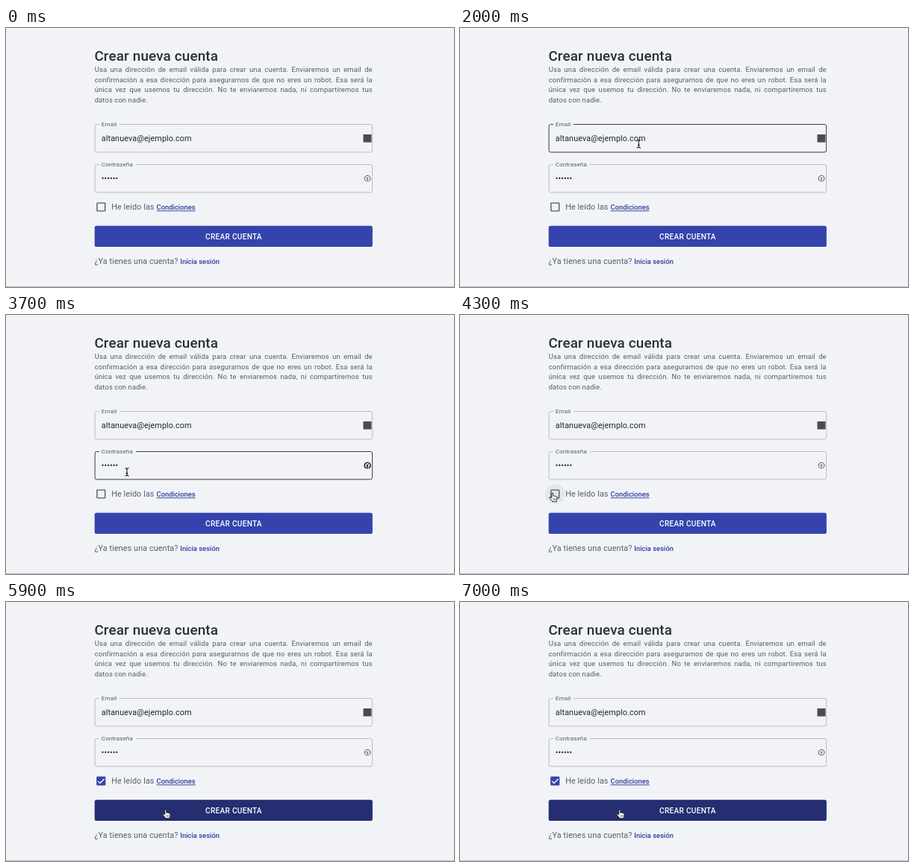
An HTML page that plays this animation: 600 px wide and 348 px high, repeating every 7.1 s.

```html
<!DOCTYPE html>
<html lang="es">
<head>
<meta charset="utf-8">
<title>Crear nueva cuenta</title>
<style>
  html, body { margin: 0; width: 100%; height: 100%; overflow: hidden; background: #f1f3f6; }
  #stage { position: absolute; left: 0; top: 0; width: 600px; height: 348px; overflow: hidden; }
  svg { position: absolute; left: 0; top: 0; }
  #stage { font-family: Roboto, Arial, sans-serif; color: #50606d; }
  text { fill: #50606d; }
  .title { font-size: 18.9px; font-weight: 500; letter-spacing: .0075em; fill: #26303b; }
  .intro { position: absolute; left: 118.7px; top: 49px; width: 372px;
    font-size: 9.45px; line-height: 13.5px; letter-spacing: .01071em; }
  .intro div { white-space: nowrap; text-align-last: justify; }
  .intro div:last-child { text-align-last: left; }
  .label { font-size: 8.1px; letter-spacing: .00938em; }
  .body { font-size: 10.8px; letter-spacing: .00938em; }
  .value { fill: #1f262d; }
  .link { font-size: 9.4px; font-weight: 500; fill: #2d3c9f; }
  .action { font-size: 10.1px; font-weight: 500; letter-spacing: .02857em; fill: #fff; text-anchor: middle; }
  .field { fill: none; stroke: #b4b7bb; stroke-width: .9; }
  .field.hover { stroke: #252a30; }
  .key { fill: none; stroke: #4a4d50; stroke-width: 1; }
  .key.hover { stroke: #24272a; stroke-width: 1.6; }
  .cursor { fill: #fff; stroke: #16181b; stroke-width: .9; stroke-linejoin: round; }
</style>
</head>
<body>
<div id="stage">
  <svg width="600" height="348" viewBox="0 0 600 348">
    <defs>
      <clipPath id="buttonClip"><rect x="118.7" y="265.7" width="372.2" height="28.4" rx="2.7"/></clipPath>
    </defs>
    <rect y="347" width="600" height="1" fill="#bfc2c5"/>
    <text class="title" x="118.4" y="43.6">Crear nueva cuenta</text>

    <path id="email" class="field" d="M125 129.5H121.6a2.5 2.5 0 0 0-2.5 2.5V164.4a2.5 2.5 0 0 0 2.5 2.5H488.1a2.5 2.5 0 0 0 2.5-2.5V132a2.5 2.5 0 0 0-2.5-2.5H152"/>
    <text class="label" x="127.8" y="132">Email</text>
    <text class="body value" x="127.8" y="152.4">altanueva@ejemplo.com</text>
    <rect x="478.5" y="143" width="11" height="10.6" fill="#4b4c4e"/>

    <path id="pass" class="field" d="M125 183.5H121.6a2.5 2.5 0 0 0-2.5 2.5V218.4a2.5 2.5 0 0 0 2.5 2.5H488.1a2.5 2.5 0 0 0 2.5-2.5V186a2.5 2.5 0 0 0-2.5-2.5H174"/>
    <text class="label" x="127.8" y="186">Contraseña</text>
    <text class="body value" x="127.8" y="206">••••••</text>
    <g id="key" class="key">
      <path d="M482.6 205.8A3.9 3.9 0 1 1 485.6 205.8"/>
      <path d="M484 202.2V206.6M482.6 201.6h2.8"/>
    </g>

    <circle id="halo" cx="127.3" cy="240.5" r="13.2"/>
    <g transform="translate(119.2 232.4) scale(.675)">
      <rect id="box" x="4" y="4" width="16" height="16" rx="1" stroke-width="2"/>
      <path id="tick" d="M5.8 12.2L10 16.4L18.4 8" fill="none" stroke="#fff" stroke-width="2"/>
    </g>
    <text class="body" x="141.2" y="244.4">He leído las</text>
    <text class="link" x="201.6" y="244.3" text-decoration="underline">Condiciones</text>

    <rect id="shadow" x="119.2" y="267.5" width="371.5" height="29" rx="3" fill="#20284f"/>
    <g clip-path="url(#buttonClip)">
      <rect id="button" x="118" y="265" width="374" height="30"/>
      <circle id="ripple" cx="214" cy="280" fill="#fff"/>
    </g>
    <text class="action" x="304.9" y="283.5">CREAR CUENTA</text>

    <text class="body" x="118.4" y="316.8">¿Ya tienes una cuenta?</text>
    <text class="link" x="233.3" y="316.6">Inicia sesión</text>
  </svg>

  <div class="intro">
    <div>Usa una dirección de email válida para crear una cuenta. Enviaremos un email de</div>
    <div>confirmación a esa dirección para asegurarnos de que no eres un robot. Esa será la</div>
    <div>única vez que usemos tu dirección. No te enviaremos nada, ni compartiremos tus</div>
    <div>datos con nadie.</div>
  </div>

  <svg width="600" height="348" viewBox="0 0 600 348">
    <g id="pointer" class="cursor">
      <path id="arrow" d="M0 0V11.5L2.7 9L4.6 13.2L6.5 12.3L4.7 8.3H8.2Z"/>
      <g id="beam" fill="none">
        <path d="M-2.6 -5.2Q0 -5.2 0 -3.6Q0 -5.2 2.6 -5.2M0 -3.8V3.8M-2.6 5.2Q0 5.2 0 3.6Q0 5.2 2.6 5.2M-1.4 1.6H1.4" stroke-width="1.1"/>
      </g>
      <g id="hand">
        <path d="M-1.2 1.1Q-1.2 0 -.2 0Q.8 0 .8 1.1V4.3Q1.8 3.4 2.7 4.5Q3.7 3.8 4.4 4.9Q5.9 4.5 6 6V8Q6 9.3 5.2 10.4V11.7H-.6V10.7Q-2.2 9.3 -4 6.7Q-4.2 5.5 -3 5.6Q-2 6 -1.2 7.1Z"/>
        <path d="M1.2 7.3V9.7M2.7 7.3V9.7M4.1 7.3V9.7" stroke-width=".6"/>
      </g>
    </g>
  </svg>
</div>

<script>
const LOOP = 7100, STEP = 100;
const el = id => document.getElementById(id);
const show = (id, on) => { el(id).style.display = on ? '' : 'none'; };
const ramp = (t, a, b) => Math.min(1, Math.max(0, (t - a) / (b - a)));
const mix = (a, b, k) => `rgb(${a.map((v, i) => Math.round(v + (b[i] - v) * k))})`;

// Pointer path: time, x, y
const path = [
  [600, 138, 308], [700, 134, 232], [800, 130, 200], [900, 128, 176],
  [1000, 127.8, 164], [1100, 131, 158], [1300, 136, 152], [1500, 165, 150],
  [1800, 262, 153], [2100, 228, 157], [2300, 206, 165], [2400, 197, 190],
  [2600, 186, 208], [2900, 184, 212], [3000, 180, 210], [3300, 163, 203],
  [3700, 162, 211], [3800, 152, 219], [3900, 138, 230], [4000, 129, 236],
  [4300, 124, 239], [4700, 125, 240], [4900, 162, 258], [5100, 191, 269.5],
  [5300, 211, 277], [5600, 214, 279]
];

function locate(t) {
  if (t < path[0][0]) return null;
  const i = path.findIndex(p => p[0] > t);
  if (i < 0) return path[path.length - 1].slice(1);
  const [a, b] = [path[i - 1], path[i]];
  const k = ramp(t, a[0], b[0]);
  return [a[1] + (b[1] - a[1]) * k, a[2] + (b[2] - a[2]) * k];
}

function target(p) {
  if (!p) return '';
  const [x, y] = p;
  if (Math.hypot(x - 127.3, y - 240.5) < 13) return 'check';
  if (x < 119 || x > 491) return '';
  if (y > 129 && y < 167) return 'email';
  if (y > 183 && y < 221) return 'pass';
  if (y > 266 && y < 294) return 'button';
  return '';
}

function render(t) {
  const p = locate(t), over = target(p);
  const lit = target(locate(t - STEP)); // hover styling trails the pointer by one step
  const checked = t >= 4600;

  show('pointer', p);
  if (p) el('pointer').setAttribute('transform', `translate(${p[0]} ${p[1]})`);
  const beam = over === 'email' || over === 'pass';
  const hand = over === 'check' || over === 'button';
  show('beam', beam);
  show('hand', hand);
  show('arrow', !beam && !hand);

  el('email').classList.toggle('hover', lit === 'email');
  el('pass').classList.toggle('hover', lit === 'pass');
  el('key').classList.toggle('hover', lit === 'pass');

  show('halo', lit === 'check');
  el('halo').setAttribute('fill', checked ? '#dee2f0' : '#e2e7ed');
  el('box').setAttribute('fill', checked ? '#3444ac' : 'none');
  el('box').setAttribute('stroke', checked ? '#3444ac' : '#4c5862');
  show('tick', checked);

  const press = ramp(t, 6200, 6300) * (1 - ramp(t, 6400, 6700));
  el('button').setAttribute('fill', mix([52, 68, 172], [36, 46, 113], ramp(t, 4950, 5200)));
  el('ripple').setAttribute('r', 20 + 300 * ramp(t, 6300, 6600));
  el('ripple').setAttribute('opacity', .12 * press);
  el('shadow').setAttribute('opacity', .3 * press);
}

const start = performance.now();
function tick() {
  const t = (performance.now() - start) % LOOP;
  render(Math.floor(t / STEP) * STEP);
  requestAnimationFrame(tick);
}
tick();
</script>
</body>
</html>
```
